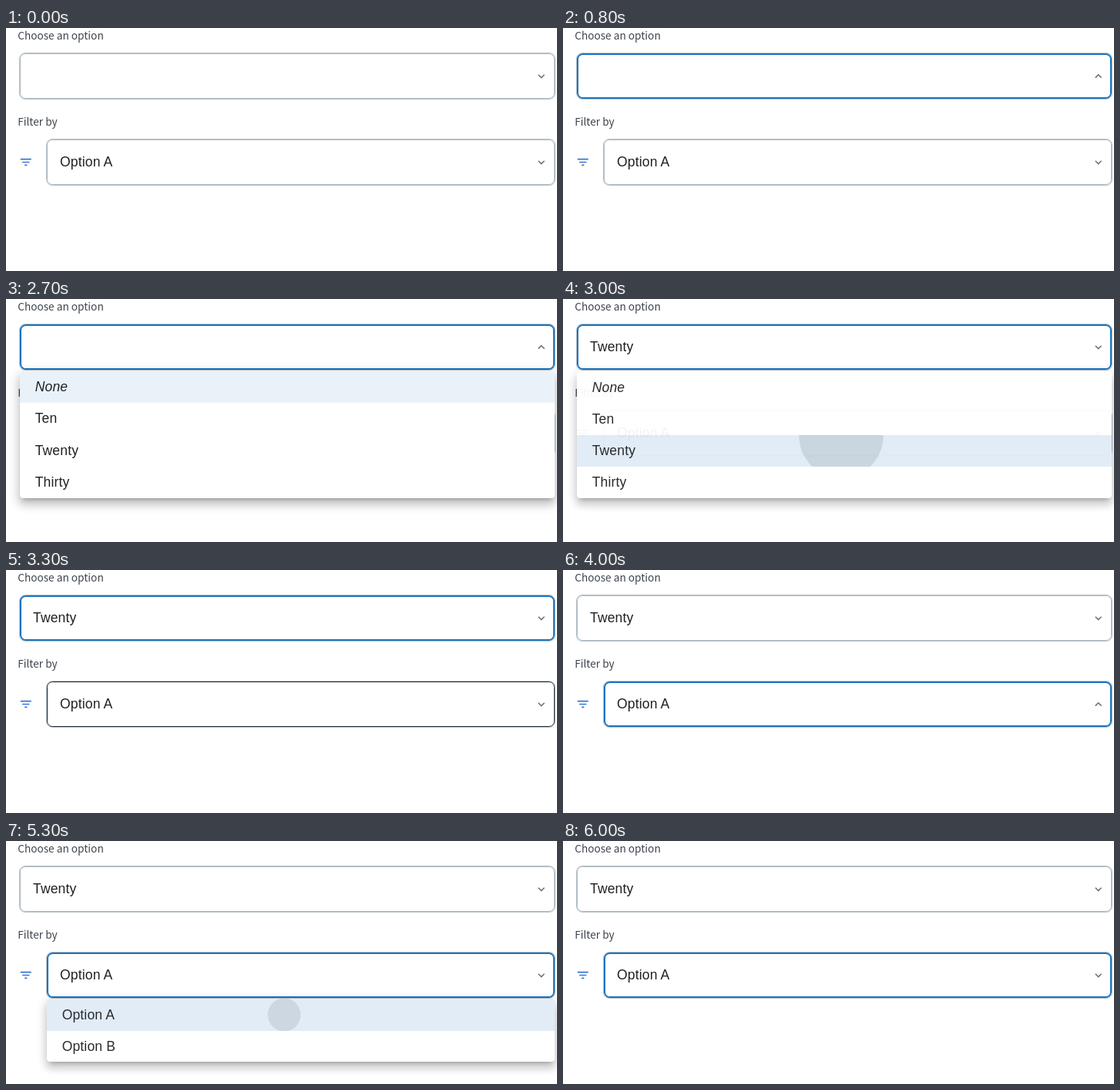
An HTML page for the animation above (6300 ms loop, 715 by 316 pixels).

```html
<!DOCTYPE html>
<html lang="en">
<head>
<meta charset="utf-8">
<title>Select fields</title>
<style>
  html, body { margin: 0; width: 100%; height: 100%; overflow: hidden; background: #fff; }
  svg { display: block; }
  text { font: 17.5px "Liberation Sans", Arial, sans-serif; letter-spacing: .16px; fill: #1f2124; white-space: pre; }
  .label { font: 13.65px "Noto Sans CJK JP", "Noto Sans CJK SC", "Open Sans", sans-serif; letter-spacing: 0; fill: #3d434c; }
  .italic { font-style: italic; }
  .outer { fill: #fff; stroke: #b6c0c7; }
  .inner { fill: none; }
  .arrow { fill: none; stroke: #6c7076; stroke-width: 1.5; }
</style>
</head>
<body>
<svg id="stage" width="715" height="316" viewBox="0 0 715 316"></svg>
<script>
const LOOP = 6300, STEP = 100;
const stage = document.getElementById('stage');

function add(parent, tag, attrs, text) {
  const node = document.createElementNS('http://www.w3.org/2000/svg', tag);
  set(node, attrs);
  if (text) node.textContent = text;
  parent.appendChild(node);
  return node;
}

function set(node, attrs) {
  for (const key in attrs) node.setAttribute(key, attrs[key]);
}

const clamp = v => Math.min(1, Math.max(0, v));
const within = (t, from, to) => t >= from && t < to;

// cubic-bezier(.4, 0, .2, 1)
function ease(v) {
  const x = clamp(v);
  let lo = 0, hi = 1;
  for (let i = 0; i < 24; i++) {
    const s = (lo + hi) / 2, r = 1 - s;
    if (1.2 * s * r * r + .6 * s * s * r + s ** 3 < x) lo = s; else hi = s;
  }
  return lo * lo * (3 - 2 * lo);
}

function makeSelect(x, y) {
  const w = 713 - x;
  add(stage, 'rect', { class: 'outer', x: x + .5, y: y + .5, width: w - 1, height: 60, rx: 7.5 });
  const inner = add(stage, 'rect', { class: 'inner' });
  const value = add(stage, 'text', { x: x + 18, y: y + 36 });
  const arrow = add(stage, 'path', { class: 'arrow' });

  return (text, hover, focus, up) => {
    const line = focus ? 2 : 1, inset = 1 + line / 2;
    set(inner, {
      x: x + inset, y: y + inset, width: w - 2 * inset, height: 61 - 2 * inset, rx: 7.5 - inset / 2,
      'stroke-width': line, stroke: focus ? '#1b74bf' : hover ? '#1f2730' : '#aebac3'
    });
    value.textContent = text;
    const d = up ? -1.9 : 1.9;
    set(arrow, { d: `M690.8 ${y + 30.7 - d}L694.7 ${y + 30.7 + d}L698.6 ${y + 30.7 - d}` });
  };
}

// Shadow layers: offset, blur, spread, alpha
const SHADOWS = [[5.4, 5.4, -3.3, .2], [8.7, 10.9, 1.1, .14], [3.3, 15.2, 2.2, .12]];

function makeMenu(x, edges, items, baselines, clipId) {
  const top = edges[0], w = 712 - x, h = edges[items.length] - top;
  const group = add(stage, 'g', {});
  for (const [dy, blur, spread, alpha] of SHADOWS) {
    add(group, 'rect', {
      x: x - spread, y: top + dy - spread, width: w + 2 * spread, height: h + 2 * spread,
      rx: 4 + Math.max(0, spread), 'fill-opacity': alpha, style: `filter:blur(${blur / 2}px)`
    });
  }
  const frame = { x, y: top, width: w, height: h, rx: 4.5 };
  add(group, 'rect', { ...frame, fill: '#fff' });
  add(add(group, 'clipPath', { id: clipId + '-menu' }), 'rect', frame);
  const rowClip = add(add(group, 'clipPath', { id: clipId + '-row' }), 'rect', {});
  const face = add(group, 'g', { 'clip-path': `url(#${clipId}-menu)` });
  const rows = items.map(() => add(face, 'rect', { x, width: w }));
  const ripple = add(face, 'circle', { fill: '#212b36', 'clip-path': `url(#${clipId}-row)` });
  const labels = items.map((item, i) => add(group, 'text',
    { x: x + 19.7, class: item === 'None' ? 'italic' : '' }, item));

  return (t, m) => {
    const shown = t > m.open && t < m.end;
    set(group, { visibility: shown ? 'visible' : 'hidden' });
    if (!shown) return;

    const closing = t >= m.close;
    const fade = closing ? 1 - ease((t - m.close) / m.span)
                         : Math.min(1, 1.06 * ease((t - m.open) / m.span));
    const grow = closing ? 1 - ease((t - m.close - m.span / 3) / (m.span * 2 / 3))
                         : ease((t - m.open) / (m.span * 2 / 3));
    const cx = x + w / 2, sx = .75 + .25 * grow, sy = .5625 + .4375 * grow;
    set(group, {
      opacity: fade,
      transform: `translate(${cx} ${top}) scale(${sx} ${sy}) translate(${-cx} ${-top})`
    });

    // Rows sit a pixel lower while the panel is being moved
    const moved = t < m.settle || closing;
    const edge = i => edges[i] + (moved && m.shiftEdge && i === 1 ? 1 : 0);
    rows.forEach((row, i) => set(row, {
      y: edge(i), height: edge(i + 1) - edge(i), fill: m.fill(i, t)
    }));
    labels.forEach((label, i) => set(label, {
      y: baselines[i] + (moved && i < items.length / 2 ? 1 : 0)
    }));

    const p = ease((t - m.press) / 550);
    set(rowClip, { x, y: edge(m.pick), width: w, height: edge(m.pick + 1) - edge(m.pick) });
    set(ripple, { cx: 361, cy: m.pressY, r: 349 * p, opacity: t > m.press ? .1 + .2 * p : 0 });
  };
}

add(stage, 'text', { class: 'label', x: 15.2, y: 15 }, 'Choose an option');
add(stage, 'text', { class: 'label', x: 15.2, y: 127 }, 'Filter by');
add(stage, 'path', {
  d: 'M3 6h18v2H3zM6 11h12v2H6zM10 16h4v2h-4z', fill: '#3674d6',
  transform: 'translate(16.5 165.2) scale(.775)'
});

const first = makeSelect(17, 32);
const second = makeSelect(52, 144);
const numberMenu = makeMenu(18, [94, 135, 177, 218, 259],
  ['None', 'Ten', 'Twenty', 'Thirty'], [120, 161, 203, 244], 'number');
const filterMenu = makeMenu(53, [205, 246, 287], ['Option A', 'Option B'], [231, 273], 'filter');

const SOFT = '#eaf2f9', STRONG = '#e0ecf7';
const numberRun = {
  open: 800, settle: 1300, press: 2883, pressY: 178, pick: 2, close: 2965, end: 3300, span: 269,
  fill: (i, t) => t < 2900 ? (i ? '#fff' : SOFT)
    : t < 3000 ? [SOFT, '#fff', '#f5f5f5', '#fff'][i]
    : i === 2 ? STRONG : '#fff'
};
const filterRun = {
  open: 4000, settle: 4400, press: 5220, pressY: 226, pick: 0, close: 5270, end: 5500, span: 229,
  shiftEdge: true,
  fill: (i, t) => i ? '#fff' : t < 5300 ? SOFT : STRONG
};

function draw(time) {
  const t = Math.floor(time % LOOP / STEP) * STEP;
  first(t < 3000 ? '' : 'Twenty', within(t, 300, 800) || within(t, 5800, 6000),
    within(t, 800, 4000), within(t, 800, 3000));
  second('Option A', within(t, 3300, 4000), t >= 4000, within(t, 4000, 5300));
  numberMenu(t, numberRun);
  filterMenu(t, filterRun);
}

const start = performance.now();
function tick() {
  draw(performance.now() - start);
  requestAnimationFrame(tick);
}
tick();
</script>
</body>
</html>
```
